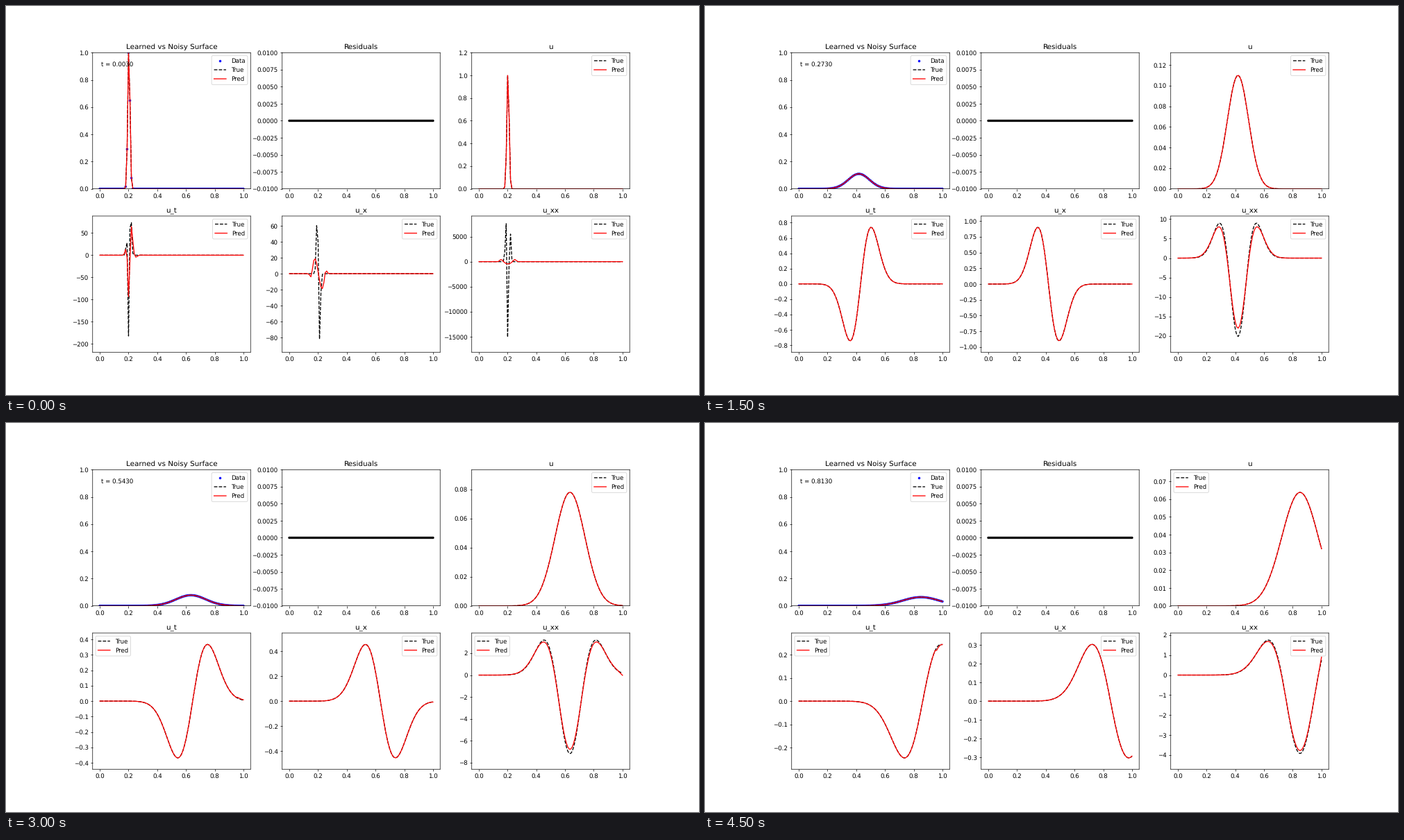
A matplotlib script for the animation above (5 s loop, 998 by 561 pixels).

```python
import numpy as np
import matplotlib.pyplot as plt
from matplotlib.animation import FuncAnimation

W, H, DPI = 998, 561, 62.375
FRAMES, INTERVAL = 10, 500
SPEED, DIFF, START = 0.8, 0.01, 0.2   # advection-diffusion pulse
T0, DT, STRIDE = 0.003, 0.003, 30
HALF, DEG = 5, 3                      # local polynomial fit

plt.rcParams.update({"path.snap": False, "text.hinting": "none"})

x = np.linspace(0, 1, 101)
DX = x[1] - x[0]


def pulse(t):
    s = x - START - SPEED * t
    return np.exp(-s**2 / (4 * DIFF * t)) / np.sqrt(t)


SCALE = 1 / pulse(T0).max()


def exact(t):
    """u, u_t, u_x and u_xx of the travelling pulse."""
    u = SCALE * pulse(t)
    var = 2 * DIFF * t
    s = x - START - SPEED * t
    ux = -s / var * u
    uxx = (s**2 / var**2 - 1 / var) * u
    return u, DIFF * uxx - SPEED * ux, ux, uxx


def weights(at, order, step):
    """Least-squares derivative weights, evaluated at offset `at`."""
    k = np.arange(-HALF, HALF + 1)
    fit = np.linalg.pinv(np.vander(k, DEG + 1, increasing=True))
    basis = [np.polyval(np.polyder(np.eye(DEG + 1)[DEG - p], order), at)
             for p in range(DEG + 1)]
    return np.array(basis) @ fit / step**order


def poly_diff(u, order):
    out = np.empty_like(u)
    for i in range(len(u)):
        c = min(max(i, HALF), len(u) - 1 - HALF)
        out[i] = weights(i - c, order, DX) @ u[c - HALF:c + HALF + 1]
    return out


def time_diff(n):
    c = max(n, HALF)
    rows = [SCALE * pulse(T0 + DT * k) for k in range(c - HALF, c + HALF + 1)]
    ut = weights(n - c, 1, DT) @ np.array(rows)
    # the right margin lags one grid cell behind
    ut[-HALF:] = ut[-HALF - 1:-1].copy()
    return ut


def estimate(n):
    u = SCALE * pulse(T0 + DT * n)
    return u, time_diff(n), poly_diff(u, 1), poly_diff(u, 2)


fig, axes = plt.subplots(2, 3, figsize=(W / DPI, (H + 0.01) / DPI), dpi=DPI)
surface, resid, *panels = axes.flat
names = ["u", "u_t", "u_x", "u_xx"]


def dots(ax, y, color, label=None):
    # one size per dot keeps them at sub-pixel positions
    ax.scatter(x, y, s=np.full(x.size, 36), c=color, marker=".",
               linewidths=1, label=label)


def curves(ax, true, pred):
    ax.plot(x, true, "k--", label="True")
    ax.plot(x, pred, "r", label="Pred")


def legend(ax, loc):
    box = ax.legend(loc=loc, scatteryoffsets=[0.5])
    box.get_frame().set_snap(False)


def draw(i):
    n = STRIDE * i
    t = T0 + DT * n
    true, pred = exact(t), estimate(n)
    for ax in axes.flat:
        ax.clear()

    dots(surface, true[0], "b", "Data")
    curves(surface, true[0], pred[0])
    surface.text(0.01, 0.9, f"t = {t:.4f}")
    surface.set_ylim(0, 1)
    surface.set_title("Learned vs Noisy Surface")
    handles, labels = surface.get_legend_handles_labels()
    legend(surface, "upper right")

    dots(resid, true[0] - pred[0], "k")
    resid.set_ylim(-0.01, 0.01)
    resid.set_title("Residuals")

    for ax, name, a, b in zip(panels, names, true, pred):
        curves(ax, a, b)
        ax.set_ylim(min(0, 1.2 * a.min()), 1.2 * a.max())
        ax.set_title(name)
        legend(ax, "best")
    return []


anim = FuncAnimation(fig, draw, frames=FRAMES, interval=INTERVAL,
                     init_func=lambda: [], repeat=True, repeat_delay=0)
plt.show()
```
